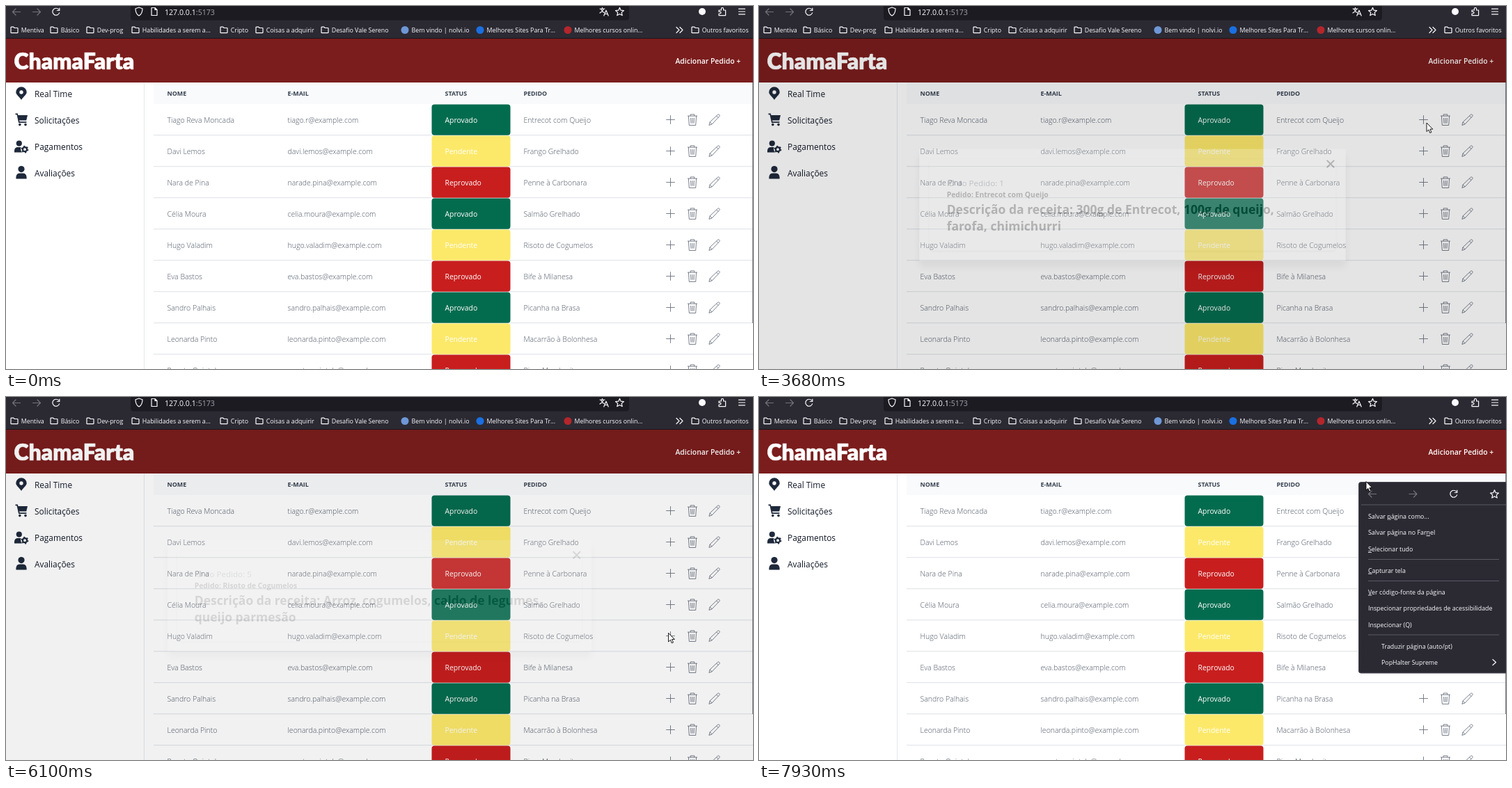
These frames come from a looping animation (1073 by 522 pixels, 8000 ms). An HTML page:

```html
<!DOCTYPE html>
<html lang="pt">
<head>
<meta charset="utf-8">
<title>Pedidos</title>
<style>
  html, body { margin: 0; width: 100%; height: 100%; overflow: hidden; background: #fff; }
  svg { position: absolute; left: 0; top: 0; display: block; }
  text { font: 400 10.4px "Open Sans", "Noto Sans", sans-serif; white-space: pre; }
  .ui { font-size: 8.85px; fill: #fbfbfe; }
  .url { font-size: 10.6px; fill: #fbfbfe; }
  .brand { font: 900 32px Lato, "Open Sans", sans-serif; fill: #fff; stroke: #fff; stroke-width: .7; stroke-linejoin: round; }
  .add { font-weight: 600; fill: #fff; }
  .side { font-size: 11.9px; fill: #111827; }
  .head { font-size: 8.9px; font-weight: 700; fill: #374151; }
  .cell { font-size: 10.5px; font-weight: 300; fill: #4b5563; }
  .status { font-size: 10.4px; fill: #fff; }
  .id { font-size: 12px; fill: #374151; }
  .dish { font-size: 10.7px; font-weight: 700; }
  .recipe { font-size: 18.1px; font-weight: 700; }
  .line { fill: none; stroke: #fbfbfe; stroke-width: 1.2; stroke-linecap: round; stroke-linejoin: round; }
  .dim { stroke: #74737c; }
  .tool { fill: none; stroke: #6b7280; stroke-width: .9; stroke-linejoin: round; }
  .u { text-decoration: underline; }
  #modal { transform-origin: 536.5px 286px; }
  .panel { filter: drop-shadow(0 9px 6px rgba(0, 0, 0, .25)); }
  .card { filter: drop-shadow(0 1.5px 1.5px rgba(0, 0, 0, .2)); }
</style>
</head>
<body>
<svg id="stage" width="1073" height="522" viewBox="0 0 1073 522"></svg>
<script>
const LOOP = 8000;

const text = (x, y, cls, s) => `<text x="${x}" y="${y}" class="${cls}">${s}</text>`;
const path = (d, cls = 'line', extra = '') => `<path d="${d}" class="${cls}" ${extra}/>`;
const rect = (x, y, w, h, fill, r = 0, extra = '') =>
  `<rect x="${x}" y="${y}" width="${w}" height="${h}" rx="${r}" fill="${fill}" ${extra}/>`;
const dot = (x, y, r, fill) => `<circle cx="${x}" cy="${y}" r="${r}" fill="${fill}"/>`;
const at = (x, y, s) => `<g transform="translate(${x} ${y})">${s}</g>`;

// Icons centred on their own origin
const back = path('M5.5 0H-5.5M-1 -4.5L-5.5 0L-1 4.5', 'line dim');
const forward = path('M-5.5 0H5.5M1 -4.5L5.5 0L1 4.5', 'line dim');
const reload = path('M4.6 1.4A5 5 0 1 1 3.6 -3.6M4.8 -5.4V-2H1.4');
const folder = path('M-5 4V-3.6Q-5 -4.4 -4.2 -4.4H-1.2L.2 -3H4.2Q5 -3 5 -2.2V3.4Q5 4.2 4.2 4.2H-4.4Z');
const starPoints = Array.from({ length: 10 }, (_, i) => {
  const r = i % 2 ? 2.9 : 6.3, a = i * Math.PI / 5;
  return `${(r * Math.sin(a)).toFixed(2)} ${(.5 - r * Math.cos(a)).toFixed(2)}`;
});
const star = path(`M${starPoints.join('L')}Z`);
const plus = path('M-6.3 0H6.3M0 -6.3V6.3', 'tool');
const trash = path('M-7 -5.4H7M-2.8 -5.4V-7.6H2.8V-5.4M-5.6 -5.4L-4.7 8H4.7L5.6 -5.4M-2.4 -2.5L-2 5.2M0 -2.5V5.2M2.4 -2.5L2 5.2', 'tool');
const pencil = path('M-7.6 8L-6.4 3.4L4.8 -7.2Q6 -8.2 7.2 -7Q8.2 -5.8 7.2 -4.8L-3.4 6.4ZM-6.4 3.4L-3.4 6.4M3 -5.5L5.6 -2.9', 'tool');

function browserBar() {
  const marks = [
    [12, 'Mentiva'], [69, 'Básico'], [121, 'Dev-prog'], [186, 'Habilidades a serem a...'],
    [313, 'Cripto'], [364, 'Coisas a adquirir'], [458, 'Desafio Vale Sereno'],
    [573, 'Bem vindo | nolvi.io', '#6f97d6'], [681, 'Melhores Sites Para Tr...', '#1b6fe0'],
    [807, 'Melhores cursos onlin...', '#b3262b'], [990, 'Outros favoritos'],
  ];
  return rect(0, 0, 1073, 47, '#2b2a33') + rect(179, -8, 716, 28.5, '#1c1b22', 4) +
    rect(0, 46, 1073, 1, '#17161c') +
    at(15, 8.5, back) + at(44, 8.5, forward) + at(72, 8.5, reload) +
    at(191, 8, path('M0 -6L5 -4.2C5 1.2 3.5 4.2 0 6C-3.5 4.2 -5 1.2 -5 -4.2Z')) +
    at(213, 8, path('M-4 -5.5H1L4 -2.5V5.5H-4ZM1 -5.5V-2.5H4')) +
    text(228, 12.5, 'url', '127.0.0.1<tspan fill="#a5a4ad">:5173</tspan>') +
    at(859, 8, path('M-6 -4H1M-2.5 -5.6V-4M-.5 -4Q-2 0 -6 2M-4.6 -4Q-3 0 0 1.4M-.2 6L3 -1.8L6.2 6M.9 3.5H5.1')) +
    at(881.5, 8, star) + dot(1000, 8, 5, '#fbfbfe') +
    at(1029, 8, path('M-5 -2H-1.6V-4Q-1.4 -5.6 0 -5.6Q1.4 -5.6 1.6 -4V-2H4.6V5.6H-5V3H-3.4Q-2 2.6 -2 1.6Q-2 .4 -3.4 .2H-5Z')) +
    at(1057, 8, path('M-4.5 -3.8H4.5M-4.5 0H4.5M-4.5 3.8H4.5')) +
    at(967, 34.5, path('M-4 -4L0 0L-4 4M1 -4L5 0L1 4')) +
    marks.map(([x, s, tint]) =>
      (tint ? dot(x, 34.5, 5.5, tint) : at(x, 34.5, folder)) +
      text(x + (tint ? 9.5 : 9.7), 38, 'ui', s)).join('');
}

function sidebar() {
  const ink = '#1e293b';
  const gear = `<circle r="3" fill="none" stroke="${ink}" stroke-width="2.2"/>` +
    `<circle r="4.6" fill="none" stroke="${ink}" stroke-width="1.6" stroke-dasharray="2.1 2.72"/>`;
  const icons =
    path('M22 135C18.4 129.6 14.3 127.3 14.3 124a7.7 7.7 0 0 1 15.4 0C29.7 127.3 25.6 129.6 22 135Z', '') +
    dot(22, 124, 2.7, '#fff') +
    path('M17 157H31L29.2 164.4H18.4Z', '') +
    `<path d="M13.5 155.3H16.2L18.8 167.2H29.4" fill="none" stroke="${ink}" stroke-width="1.7"/>` +
    dot(19.8, 170.6, 1.8, ink) + dot(28, 170.6, 1.8, ink) +
    dot(18.8, 197.6, 4.1, ink) + path('M12 210.4V208Q12.4 203 17 203H21.5Q20.2 207 23 210.4Z', '') +
    at(27, 206.2, gear) +
    dot(22, 234.6, 4.6, ink) + path('M14.4 248.6V246Q15 240.6 20 240.6H24Q29 240.6 29.6 246V248.6Z', '');
  return rect(198, 110, 1, 412, '#e5e7eb') + `<g fill="${ink}">${icons}</g>` +
    ['Real Time', 'Solicitações', 'Pagamentos', 'Avaliações']
      .map((s, i) => text(41, 131 + 38 * i, 'side', s)).join('');
}

function table() {
  const states = [['Aprovado', '#046c4e'], ['Pendente', '#fce96a'], ['Reprovado', '#c81e1e']];
  const orders = [
    ['Tiago Reva Moncada', 'tiago.r@example.com', 'Entrecot com Queijo'],
    ['Davi Lemos', 'davi.lemos@example.com', 'Frango Grelhado'],
    ['Nara de Pina', 'narade.pina@example.com', 'Penne à Carbonara'],
    ['Célia Moura', 'celia.moura@example.com', 'Salmão Grelhado'],
    ['Hugo Valadim', 'hugo.valadim@example.com', 'Risoto de Cogumelos'],
    ['Eva Bastos', 'eva.bastos@example.com', 'Bife à Milanesa'],
    ['Sandro Palhais', 'sandro.palhais@example.com', 'Picanha na Brasa'],
    ['Leonarda Pinto', 'leonarda.pinto@example.com', 'Macarrão à Bolonhesa'],
    ['Renato Quintela', 'renato.quintela@example.com', 'Pizza Margherita'],
  ];
  const head = [[231.5, 'NOME'], [404.5, 'E-MAIL'], [630.5, 'STATUS'], [743.5, 'PEDIDO']];
  return rect(212, 110, 861, 31, '#f9fafb') +
    head.map(([x, s]) => text(x, 129.3, 'head', s)).join('') +
    orders.map(([name, mail, dish], i) => {
      const y = 141 + 45 * i, [label, fill] = states[i % 3];
      return rect(212, y + 44, 861, 1.3, '#e5e7eb') + rect(611.5, y + .4, 113, 44.3, fill, 4) +
        text(231.5, y + 27, 'cell', name) + text(404.5, y + 27, 'cell', mail) +
        text(630.5, y + 27, 'status', label) + text(743.5, y + 27, 'cell', dish) +
        at(954.5, y + 22.5, plus) + at(986, y + 22.5, trash) + at(1017.5, y + 22.5, pencil);
    }).join('') +
    rect(1072, 110, 1, 346, '#7f7f88');
}

function modal() {
  return `<g id="modal">` +
    rect(220.5, 203, 632, 166, '#fff', 0, 'class="panel"') +
    rect(235, 218, 603, 136, '#fff', 6, 'class="card"') +
    '<text id="orderId" x="261" y="258.3" class="id"></text>' +
    '<text id="dish" x="261" y="275" class="dish"></text>' +
    '<text id="line1" x="261" y="299" class="recipe"></text>' +
    '<text id="line2" x="261" y="324" class="recipe"></text>' +
    path('M824.8 219.8L835.6 230.6M835.6 219.8L824.8 230.6', '', 'stroke="#000" stroke-width="2.1"') + '</g>';
}

function contextMenu() {
  const key = c => `<tspan class="u">${c}</tspan>`;
  const items = [
    [174.5, `Salvar ${key('p')}ágina como...`], [198.2, `Salvar página no Far${key('n')}el`],
    [222, `${key('S')}elecionar tudo`], [252.7, `${key('C')}apturar tela`],
    [283.5, `${key('V')}er código-fonte da página`], [307.2, 'Inspecionar propriedades de acessibilidade'],
    [331, 'Inspecionar (Q)'], [361.5, 'Traduzir página (auto/pt)', 894], [385.3, 'PopHalter Supreme', 894],
  ];
  return '<g id="menu">' +
    rect(861.5, 122.5, 215, 274.5, '#2b2a33', 3, 'stroke="#4a4953"') +
    at(881, 139.5, back) + at(939.5, 139.5, forward) + at(998, 139.5, reload) + at(1056.5, 139.5, star) +
    rect(865, 154.5, 208, 1, '#5b5a64') +
    [233, 264, 341.5].map(y => rect(875, y, 188, 1, '#5b5a64')).join('') +
    items.map(([y, s, x = 875]) => text(x, y, 'ui', s)).join('') +
    path('M1054 377.5L1058.5 381.5L1054 385.5') + '</g>';
}

const stage = document.getElementById('stage');
stage.innerHTML =
  rect(0, 0, 1073, 522, '#fff') + sidebar() + table() +
  rect(0, 47, 1073, 63, '#7b1d1d') + text(11.5, 91, 'brand', 'ChamaFarta') +
  text(961.5, 83, 'add', 'Adicionar Pedido +') +
  rect(0, 47, 1073, 475, '#000', 0, 'id="shade"') + modal() + browserBar() + contextMenu() +
  path('M0 0V12.6L2.9 9.9L4.8 14.5L6.9 13.6L4.9 9.1H8.8Z', '',
    'id="cursor" fill="#fff" stroke="#000" stroke-width=".9" stroke-linejoin="round"');

const part = id => document.getElementById(id);
const [shade, box, menu, cursor] = ['shade', 'modal', 'menu', 'cursor'].map(part);

// Pointer path: time, x, y
const route = [
  [0, 1030, 540], [70, 1010, 505], [230, 860, 330], [400, 600, 185], [560, 388, 145],
  [700, 474, 97], [820, 614, 98], [920, 795, 150], [1050, 600, 248], [1170, 344, 190],
  [1280, 474, 100], [1380, 639, 224], [1540, 800, 195], [1660, 750, 225], [1800, 820, 300],
  [2000, 610, 427], [2200, 412, 330], [2360, 520, 214], [2500, 680, 280], [2700, 500, 436],
  [2950, 740, 320], [3280, 964, 172], [3500, 959, 168], [3750, 959, 168], [4150, 923, 176],
  [4360, 864, 198], [4600, 830, 224], [5130, 832.5, 224], [5500, 905, 300], [5820, 953, 340],
  [6080, 953, 340], [6240, 911, 318], [6600, 840, 232], [6760, 829, 222], [7000, 829, 222],
  [7380, 856, 112], [7540, 856, 112], [7680, 861, 121], [7900, 872, 121.5], [8000, 872, 121.5],
];

// Monotone cubic through the route, so rests stay still and turns do not overshoot
function glide(t, axis) {
  const i = Math.max(0, route.findIndex(p => p[0] > t) - 1);
  const rate = k => route[k] && route[k + 1]
    ? (route[k + 1][axis] - route[k][axis]) / (route[k + 1][0] - route[k][0]) : 0;
  const slope = k => {
    const a = rate(k - 1), b = rate(k);
    return a * b <= 0 ? 0 : 2 * a * b / (a + b);
  };
  const span = route[i + 1][0] - route[i][0], u = (t - route[i][0]) / span, v = 1 - u;
  return route[i][axis] * v * v * (1 + 2 * u) + route[i + 1][axis] * u * u * (3 - 2 * u) +
    span * u * v * (slope(i) * v - slope(i + 1) * u);
}

const dialogs = [
  { open: 3650, close: 4990, id: 1, dish: 'Entrecot com Queijo',
    lines: ['300g de Entrecot, 100g de queijo,', 'farofa, chimichurri'] },
  { open: 6085, close: 6830, id: 5, dish: 'Risoto de Cogumelos',
    lines: ['Arroz, cogumelos, caldo de legumes,', 'queijo parmesão'] },
];
const FADE = 145, MENU_AT = 7710;
const clamp = v => Math.min(1, Math.max(0, v));
let shown = null;

function fill(d) {
  if (d === shown) return;
  shown = d;
  part('orderId').textContent = `ID do Pedido: ${d.id}`;
  part('dish').textContent = `Pedido: ${d.dish}`;
  part('line1').textContent = `Descrição da receita: ${d.lines[0]}`;
  part('line2').textContent = d.lines[1];
}

function draw(t) {
  const d = dialogs[t < 5500 ? 0 : 1];
  const p = clamp((t - d.open) / FADE) * (1 - clamp((t - d.close) / FADE));
  fill(d);
  shade.setAttribute('opacity', p * .5);
  box.setAttribute('opacity', p);
  box.style.transform = `scale(${.96 + .04 * p})`;
  menu.setAttribute('visibility', t >= MENU_AT ? 'visible' : 'hidden');
  cursor.setAttribute('transform', `translate(${glide(t, 1)} ${glide(t, 2)})`);
}

const start = performance.now();
function tick() {
  draw((performance.now() - start) % LOOP);
  requestAnimationFrame(tick);
}
tick();
</script>
</body>
</html>
```
